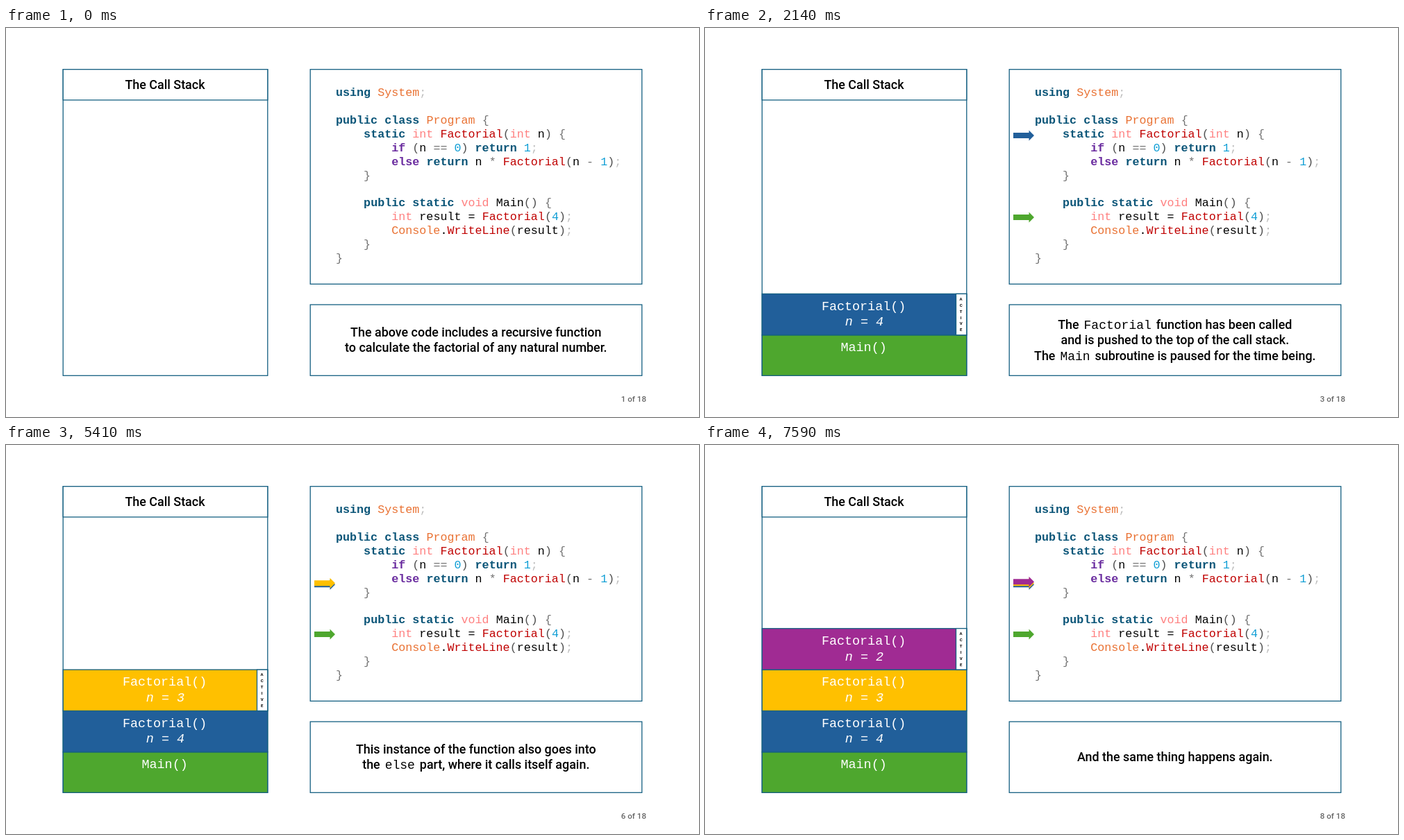
Write an HTML page with a canvas that moves like this. It is 998 px wide and 561 px high and loops after 8 s.

```html
<!DOCTYPE html>
<html lang="en">
<head>
<meta charset="utf-8">
<title>Call stack</title>
<style>
  html, body { margin: 0; width: 100%; height: 100%; overflow: hidden; background: #fff; }
  canvas { display: block; width: 998px; height: 561px; }
</style>
</head>
<body>
<canvas id="stage"></canvas>
<script>
const W = 998, H = 561, LOOP = 8000, STEP = 1090, LEAD = 40;
const SANS = 'Roboto, "Open Sans", sans-serif';
const MONO = '"Liberation Mono", monospace';
const BORDER = '#156082';
const GREEN = '#4ea72e', BLUE = '#215f9a', YELLOW = '#ffc000', PURPLE = '#a02b93';

const canvas = document.getElementById('stage');
const ctx = canvas.getContext('2d');
const ratio = window.devicePixelRatio || 1;
canvas.width = Math.round(W * ratio);
canvas.height = Math.round(H * ratio);

const code = `using System;

public class Program {
    static int Factorial(int n) {
        if (n == 0) return 1;
        else return n * Factorial(n - 1);
    }

    public static void Main() {
        int result = Factorial(4);
        Console.WriteLine(result);
    }
}`.split('\n');

// Syntax colours: pattern, colour, bold
const syntax = [
  [/^(using|public|class|static|return)$/, '#0b5578', true],
  [/^(if|else)$/, '#6a2c9f', true],
  [/^(int|void)$/, '#ff8080'],
  [/^(System|Program|Console)$/, '#e97132'],
  [/^(Factorial|WriteLine)$/, '#c00000'],
  [/^\d+$/, '#0f9ed5'],
  [/^;$/, '#bfbfbf'],
  [/^([{}*-]|==)$/, '#737373'],
  [/^[()]$/, '#505050']
];

const frames = [
  { name: 'Main()', fill: GREEN },
  { name: 'Factorial()', arg: 'n = 4', fill: BLUE },
  { name: 'Factorial()', arg: 'n = 3', fill: YELLOW },
  { name: 'Factorial()', arg: 'n = 2', fill: PURPLE }
];

// depth: stack height; arrows: centre y of each frame's arrow
const steps = [
  { depth: 0, arrows: [], text: [
    'The above code includes a recursive function',
    'to calculate the factorial of any natural number.'] },
  { depth: 1, arrows: [254.5], text: [
    'The program starts at the `Main()` subroutine.',
    'This is pushed to the top of the call stack.'] },
  { depth: 2, arrows: [273, 155], text: [
    'The `Factorial` function has been called',
    'and is pushed to the top of the call stack.',
    'The `Main` subroutine is paused for the time being.'] },
  { depth: 2, arrows: [273, 201.2], text: [
    'The `Factorial` function continues',
    'into the `else` block, where it calls itself.'] },
  { depth: 3, arrows: [273, 201.2, 156], text: [
    'Another instance of the `Factorial` function',
    'is pushed to the top of the call stack.'] },
  { depth: 3, arrows: [273, 201.2, 199.2], text: [
    'This instance of the function also goes into',
    'the `else` part, where it calls itself again.'] },
  { depth: 4, arrows: [273, 201.2, 199.2, 156], text: [
    'Another instance of the `Factorial` function',
    'is pushed to the top of the call stack.'] },
  { depth: 4, arrows: [273, 201.2, 199.2, 197.2], text: [
    'And the same thing happens again.'] }
];

function write(str, x, y, font, color, align = 'left') {
  ctx.font = font;
  ctx.fillStyle = color;
  ctx.textAlign = align;
  ctx.fillText(str, x, y);
}

function box(x, y, w, h, fill) {
  ctx.fillStyle = fill;
  ctx.fillRect(x, y, w, h);
  ctx.strokeStyle = BORDER;
  ctx.lineWidth = 1.3;
  ctx.strokeRect(x, y, w, h);
}

function drawCode() {
  code.forEach((line, row) => {
    for (const match of line.matchAll(/\w+|==|[^\w\s]/g)) {
      const [, color, bold] = syntax.find(([test]) => test.test(match[0])) || [0, '#000'];
      const font = `${bold ? 'bold ' : ''}16.7px ${MONO}`;
      write(match[0], 475 + match.index * 10.03, 98 + row * 19.93, font, color);
    }
  });
}

function drawStack(depth) {
  frames.slice(0, depth).forEach(({ name, arg, fill }, i) => {
    const top = 442.8 - i * 59.4;
    const height = i ? 59.4 : 58.5;
    box(82.2, top, 294.6, height, fill);
    write(name, 228.6, top + 23.2, `18.4px ${MONO}`, '#fff', 'center');
    if (arg) write(arg, 229.4, top + 46, `italic 18.4px ${MONO}`, '#fff', 'center');
    if (i === depth - 1) {
      box(361.5, top, 15.3, height, '#fff');
      [...'ACTIVE'].forEach((letter, n) =>
        write(letter, 368.6, top + 9.4 + n * 8.9, `bold 6px ${SANS}`, '#000', 'center'));
    }
  });
}

function drawArrow(y, color) {
  const half = [[444, -4], [466.5, -4], [466.5, -7.5], [474, 0]];
  const mirror = half.slice(0, 3).reverse().map(([x, dy]) => [x, -dy]);
  ctx.fillStyle = color;
  ctx.beginPath();
  half.concat(mirror).forEach(([x, dy]) => ctx.lineTo(x, y + dy));
  ctx.fill();
}

function drawCaption(lines) {
  const pad = 2.5;
  lines.forEach((line, row) => {
    const runs = line.split('`').map((str, i) => {
      const mono = i % 2 === 1;
      const font = mono ? `18px ${MONO}` : `500 17.9px ${SANS}`;
      ctx.font = font;
      return { str, font, inset: mono ? pad : 0, width: ctx.measureText(str).width + (mono ? 2 * pad : 0) };
    });
    let x = 676.8 - runs.reduce((sum, run) => sum + run.width, 0) / 2;
    const y = 456.2 + (row - (lines.length - 1) / 2) * 22.4;
    for (const run of runs) {
      write(run.str, x + run.inset, y, run.font, '#000');
      x += run.width;
    }
  });
}

function draw(time) {
  const index = Math.floor((time % LOOP + LEAD) / STEP);
  const step = steps[index];
  ctx.setTransform(ratio, 0, 0, ratio, 0, 0);
  ctx.fillStyle = '#fff';
  ctx.fillRect(0, 0, W, H);

  box(82.2, 59.7, 294.6, 441.6, '#fff');
  box(82.2, 59.7, 294.6, 44.2, '#fff');
  box(438.2, 59.7, 477.6, 309.6, '#fff');
  box(438.2, 399, 477.6, 102.3, '#fff');
  write('The Call Stack', 229, 88, `500 17.9px ${SANS}`, '#000', 'center');

  drawCode();
  drawStack(step.depth);
  step.arrows.forEach((y, i) => drawArrow(y, frames[i].fill));
  drawCaption(step.text);
  write(`${index + 1} of 18`, 922, 538.8, `500 11.6px ${SANS}`, '#666', 'right');
}

const start = performance.now();
function tick() {
  draw(performance.now() - start);
  requestAnimationFrame(tick);
}
tick();
</script>
</body>
</html>
```
